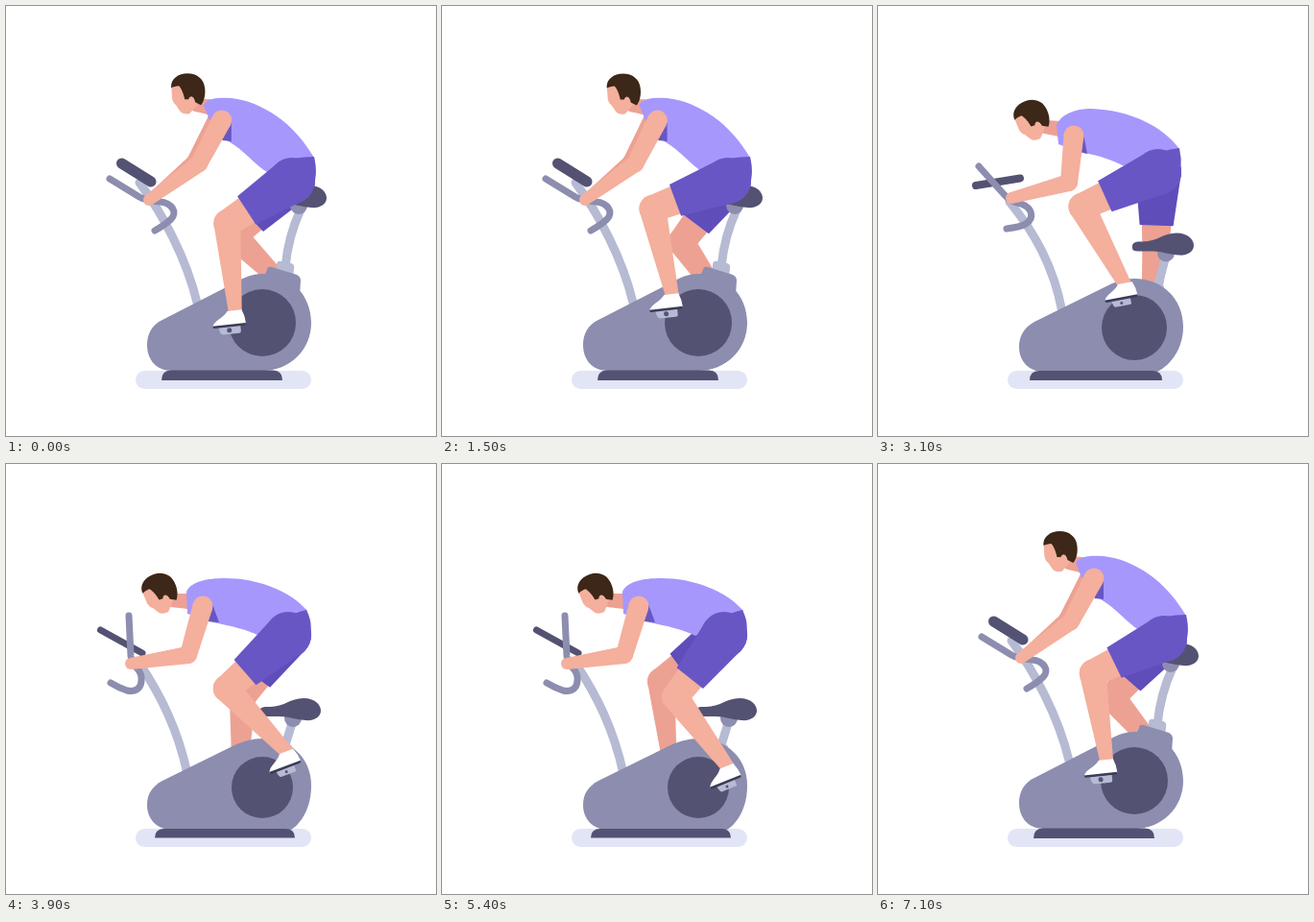
Animation, 448 px wide and 448 px high, one loop 7200 ms. Source, as an HTML page with a canvas:

```html
<!DOCTYPE html>
<html lang="en">
<head>
<meta charset="utf-8">
<title>Exercise bike</title>
<style>
  html, body { margin: 0; width: 100%; height: 100%; overflow: hidden; background: #fff; }
  canvas { display: block; width: 448px; height: 448px; }
</style>
</head>
<body>
<canvas id="stage" width="448" height="448"></canvas>
<script>
const ctx = document.getElementById('stage').getContext('2d');
const LOOP = 7200, STEP = 100;
const THIGH = 82, SHIN = 92;
const C = {
  mat: '#e1e5f6', dark: '#545273', body: '#8c8daf', light: '#b6bad3',
  skin: '#f4af9d', skinFar: '#eda193', hair: '#3d2718',
  shirt: '#a697fd', shorts: '#6856c5', shortsFar: '#5f4dba', sole: '#3c3b58'
};

// Crank angle in degrees over time
const CRANK = [[0, 168], [2400, -936], [3100, -1194], [3900, -1473], [6400, -2621], [7100, -3056], [7200, -3072]];

// Shares of the three poses: upright, standing, crouched
let weights = [1, 0, 0];

const clamp = x => Math.min(1, Math.max(0, x));
const blend = (...values) => values.reduce((sum, v, i) => sum + v * weights[i], 0);
const point = (a, m, b) => [blend(a[0], m[0], b[0]), blend(a[1], m[1], b[1])];
const shift = ([x, y], dx, dy) => [x + dx, y + dy];

function morph(a, m, b) {
  const number = /-?[\d.]+/g;
  const others = [m, b].map(s => s.match(number));
  let i = 0;
  return a.replace(number, v => {
    const out = blend(+v, +others[0][i], +others[1][i]);
    i++;
    return out.toFixed(2);
  });
}

function fill(color, path) {
  ctx.fillStyle = color;
  ctx.fill(new Path2D(path));
}

function stroke(color, width, path) {
  ctx.strokeStyle = color;
  ctx.lineWidth = width;
  ctx.lineCap = ctx.lineJoin = 'round';
  ctx.stroke(new Path2D(path));
}

function disc(color, [x, y], r) {
  ctx.fillStyle = color;
  ctx.beginPath();
  ctx.arc(x, y, r, 0, 7);
  ctx.fill();
}

// Tapered limb, round at both ends unless the far end is cut flat
function limb(color, [x1, y1], r1, [x2, y2], r2, flat) {
  const d = Math.hypot(x2 - x1, y2 - y1);
  const nx = (y1 - y2) / d, ny = (x2 - x1) / d;
  fill(color, `M${x1 + nx * r1} ${y1 + ny * r1}L${x2 + nx * r2} ${y2 + ny * r2}
    L${x2 - nx * r2} ${y2 - ny * r2}L${x1 - nx * r1} ${y1 - ny * r1}Z`);
  disc(color, [x1, y1], r1);
  if (!flat) disc(color, [x2, y2], r2);
}

function kneeOf([hx, hy], [ax, ay]) {
  const d = Math.hypot(ax - hx, ay - hy);
  const ux = (ax - hx) / d, uy = (ay - hy) / d;
  const along = (THIGH ** 2 - SHIN ** 2 + d * d) / (2 * d);
  const out = Math.sqrt(Math.max(0, THIGH ** 2 - along ** 2));
  return [hx + ux * along - uy * out, hy + uy * along + ux * out];
}

function shoe([x, y], tilt) {
  ctx.save();
  ctx.translate(x, y);
  ctx.rotate(tilt);
  fill(C.light, morph('M-11 -4H12V2Q12 4 10 4H-7Q-10 4 -11 -4Z', 'M-10 -4H10V2Q10 3 8 3H-7Q-9 3 -10 -4Z', 'M-10 -4H10V2Q10 3 8 3H-7Q-9 3 -10 -4Z'));
  disc(C.dark, [0, 0], blend(2.5, 1.5, 1.5));
  fill('#fff', 'M-17 -5C-15 -12 -5 -13 0 -20L15 -20Q18 -13 18 -5Z');
  fill(C.sole, 'M-17 -6L18 -6Q18 -3.5 16 -3.5H-15Q-17 -3.5 -17 -6Z');
  ctx.restore();
}

function leg(hip, angle, skin, shorts, near) {
  const center = point([265, 331], [266, 337], [267, 337]);
  const r = blend(33, 30, 30);
  const pedal = shift(center, r * Math.cos(angle), r * Math.sin(angle));
  const tilt = (-14 - 8 * Math.cos(angle)) * Math.PI / 180;
  const ankle = shift(pedal, blend(6, 3, 1), -20);
  // The pelvis rocks with each push
  const knee = kneeOf(shift(hip, 5 * Math.sin(angle), -3 * Math.sin(angle)), ankle);
  const cuff = [hip[0] + (knee[0] - hip[0]) * .7, hip[1] + (knee[1] - hip[1]) * .7];
  limb(skin, knee, 14, ankle, 7);
  limb(skin, hip, 18, knee, 14);
  if (near) shoe(pedal, tilt);
  limb(shorts, hip, 24, cuff, 17.5, true);
}

function seat() {
  stroke(C.light, 9, morph('M307 212Q294 240 291 272', 'M300 260Q296 275 291 294', 'M298 270Q295 280 290 296'));
  const [x, y] = point([6, -57], [1, -7.5], [0, 0]);
  ctx.save();
  ctx.translate(x, y);
  disc(C.body, [299, 265], 9);
  fill(C.dark, `M264 260C263 253 268 253 275 253C290 253 296 244 310 244C322 244 328 251 328 257
    C328 264 320 268 312 267C300 266 295 263 285 263H270C266 263 264 262 264 260Z`);
  ctx.restore();
}

function machine() {
  fill(C.light, morph('M282 270Q282 265 287 266L297 268Q301 269 300 274L299 284L281 280Z',
    'M280 292Q280 287 285 288L295 290Q299 291 298 296L297 306L279 302Z',
    'M280 294Q280 289 285 290L295 292Q299 293 298 298L297 308L279 304Z'));
  fill(C.body, morph('M272 275Q272 271 277 272L303 280Q307 282 307 286L306 301L267 285Z',
    'M262 293Q262 289 267 290L293 298Q297 300 297 304L296 319L257 303Z',
    'M262 295Q262 291 267 292L293 300Q297 302 297 306L296 321L257 305Z'));
  fill(C.body, morph(
    'M173 380C157 380 147 369 147 353C147 342 152 332 163 327L243 286C250 282 258 279 267 279C296 279 318 301 318 330C318 358 296 380 267 380Z',
    'M173 381C157 381 147 370 147 355C147 344 152 335 163 329L240 291C248 287 257 284 267 284C296 284 318 305 318 334C318 357 305 374 291 381Z',
    'M173 381C157 381 147 370 147 355C147 344 152 336 163 330L238 293C247 289 257 286 267 286C296 286 318 306 318 335C318 358 308 374 297 381Z'));
  disc(C.dark, point([267, 330], [267, 335], [267, 337]), blend(35, 34, 32));
  fill(C.dark, morph('M162 390Q162 379.5 172 379.5H278Q288 379.5 288 390Z',
    'M158 390Q158 380 168 380H286Q296 380 296 390Z',
    'M155 389.5Q155 380 165 380H291Q301 380 301 389.5Z'));
}

function handlebar() {
  stroke(C.light, 9, morph('M139 184C163 216 188 263 199 309', 'M137 204C163 236 183 271 192 319', 'M140 209C161 241 179 276 189 323'));
  stroke(C.dark, blend(11, 8, 7), morph('M120.5 164L151 183', 'M102 187L148 179.5', 'M98.5 173L142 197'));
  stroke(C.body, 7, morph(
    'M108 180L139 199C146 203 152 203 160 204C173 205 179 215 172 222C168 226 162 230 155 234',
    'M105 167L131 196C136 202 142 205 149 206C160 210 164 220 154 227C149 230 142 231 134 232',
    'M128 158L130 200C131 212 140 212 141 222C142 234 135 238 126 236C120 234 114 231 109 228'));
}

function head([x, y]) {
  ctx.save();
  ctx.translate(x, y);
  ctx.rotate(blend(0, -.33, -.33));
  fill(C.skin, 'M-17 -6L-16 9Q-15 13 -12 15L-8 21Q-5 25 2 24L10 15L8 -6Z');
  fill(C.hair, `M-17 -3C-18 -12 -10 -18 0 -18C10 -18 17 -12 18 -3C19 5 17 11 14 15L8 12
    C7 6 3 4 1 9L-3 9C-4 4 -6 -2 -9 -5C-12 -5 -15 -4 -17 -3Z`);
  ctx.restore();
}

function torso(bob, rise) {
  ctx.save();
  ctx.translate(321, rise);
  ctx.scale(1 + .05 * bob, 1);
  ctx.translate(-321, 0);
  fill(C.shirt, morph(
    'M206 103C210 96 222 95 235 96C268 100 300 122 321 158C306 166 290 171 272 173C260 166 248 150 232 141L212 118Z',
    'M186 124C192 111 208 107 222 107C262 108 298 126 314 149C298 158 275 164 259 168C245 161 230 155 213 153L188 144Z',
    'M188 133C193 122 210 119 228 119C262 119 296 132 314 153C300 164 283 173 264 179C250 172 235 169 216 165L189 156Z'));
  fill(C.shorts, morph('M235 121L235 141L226 140L220 133Z', 'M214 133L218 154L207 151L206 140Z', 'M215 146L222 165L210 164L206 152Z'));
  ctx.restore();
}

function hips(rise) {
  ctx.save();
  ctx.translate(0, rise);
  fill(C.shorts, morph('M321 157Q300 157 283 164L290 195L318 192Q326 178 321 157Z',
    'M314 148Q295 150 278 160L285 185L310 190Q319 170 314 148Z',
    'M313 152Q295 156 280 167L285 190L312 188Q323 172 313 152Z'));
  ctx.restore();
}

function crankAngle(t) {
  const i = CRANK.findIndex(([end]) => t < end);
  const [t0, a0] = CRANK[i - 1], [t1, a1] = CRANK[i];
  return (a0 + (a1 - a0) * (t - t0) / (t1 - t0)) * Math.PI / 180;
}

function setPose(t) {
  if (t < 6300) {
    const up = clamp((t - 2400) / 700) ** 2;
    const down = 1 - (1 - clamp((t - 3100) / 500)) ** 2;
    weights = [1 - up, up - down, down];
  } else {
    const k = clamp((t - 6300) / 800), back = k * k * (3 - 2 * k);
    weights = [back, 0, 1 - back];
  }
}

function draw(t) {
  setPose(t);
  const angle = crankAngle(t);
  const bob = weights[0] * (1 - Math.cos(2 * angle)) / 2;
  const k = clamp((t - 2400) / 700);
  const rise = -16 * Math.sin(Math.PI * k) * (1 - k);
  const sway = p => shift(p, -8 * bob, 4.5 * bob + rise);
  const hip = shift(point([298, 182], [292, 173], [294, 178]), 0, rise);
  const shoulder = shift(point([225, 119], [204, 135], [205, 148]), -6 * bob, bob + rise);
  const elbow = shift(point([201, 164], [199, 184], [190, 199]), 2 * bob, 3 * bob);
  const hand = point([149, 202], [139, 200], [130, 208]);

  ctx.clearRect(0, 0, 448, 448);
  fill(C.mat, 'M144.5 380H308.5A9.5 9.5 0 0 1 308.5 399H144.5A9.5 9.5 0 0 1 144.5 380Z');
  leg(hip, angle + Math.PI, C.skinFar, C.shortsFar, false);
  seat();
  handlebar();
  machine();

  const lag = -6 * weights[0];
  limb(C.skinFar, shift(shoulder, lag, 0), 9, shift(elbow, lag, -2), 7);
  limb(C.skinFar, shift(elbow, lag, -2), 7, hand, 5);
  limb(C.skinFar, sway(point([199, 103], [174, 126], [172, 142])), 7, sway(point([212, 105], [190, 128], [190, 143])), 8);
  head(sway(point([189.5, 88], [159.5, 116], [159.5, 132])));
  torso(bob, rise);
  hips(rise);
  leg(hip, angle, C.skin, C.shorts, true);
  limb(C.skin, shoulder, 10.5, elbow, 9);
  limb(C.skin, elbow, 9, hand, 6);
}

function tick() {
  // The picture advances in even steps; the small lead covers display latency
  const t = Math.floor((performance.now() + 20) / STEP) * STEP % LOOP;
  draw(t);
  requestAnimationFrame(tick);
}
tick();
</script>
</body>
</html>
```
